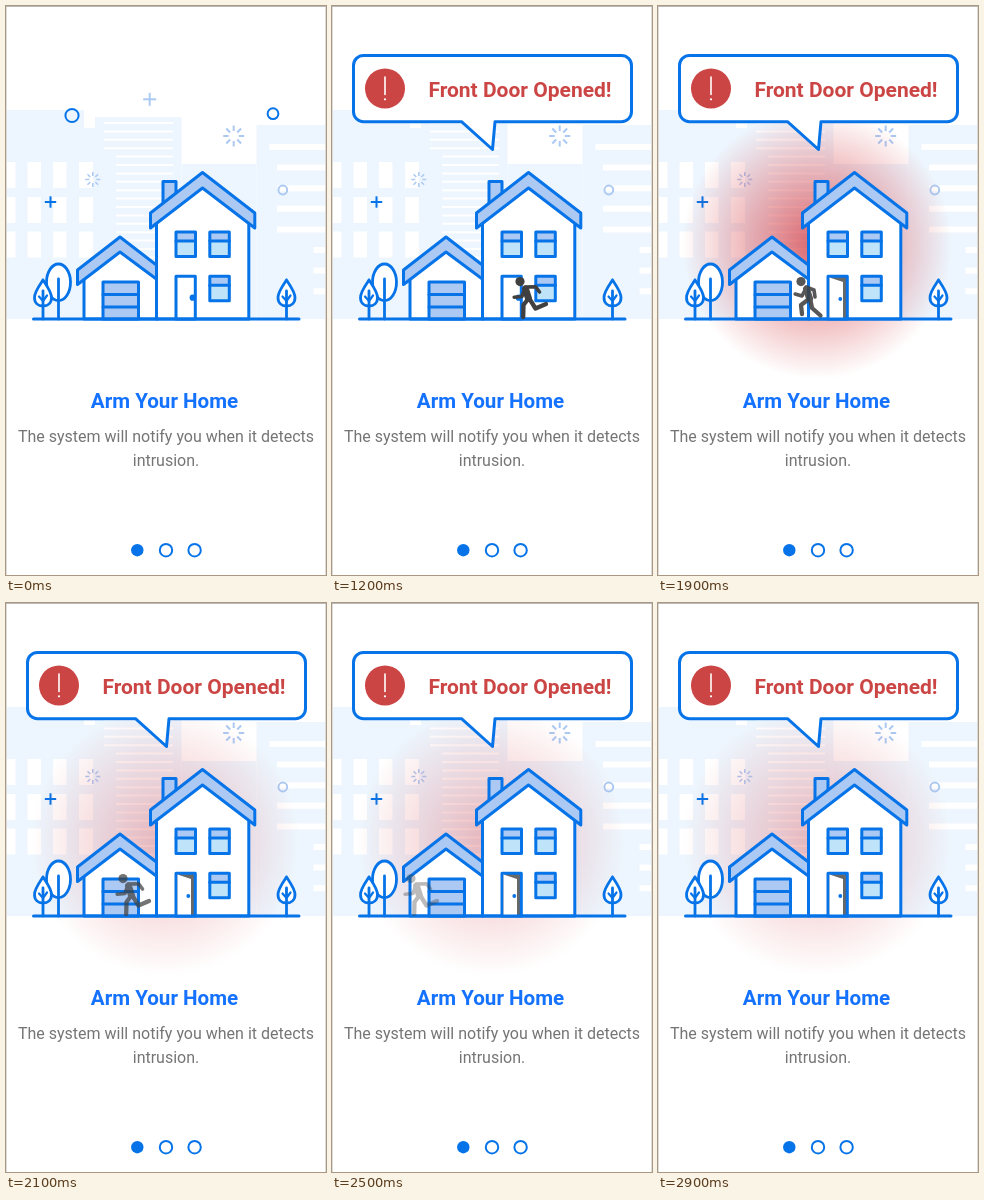
Recreate the animation shown at these times as an HTML page with a canvas. Size 320 by 569 pixels, loop 3100 ms.

```html
<!DOCTYPE html>
<html lang="en">
<head>
<meta charset="utf-8">
<title>Arm Your Home</title>
<style>
  html, body { margin: 0; width: 100%; height: 100%; overflow: hidden; background: #fff; }
  canvas { display: block; width: 320px; height: 569px; }
</style>
</head>
<body>
<canvas id="stage"></canvas>
<script>
const W = 320, H = 569, LOOP = 3100, STEP = 200;
const BLUE = '#0674e8', PALE = '#abc9f3', GLASS = '#bfe4f9', CITY = '#edf6fe';
const RED = '#cc4545', DARK = '#404040';

const canvas = document.getElementById('stage');
const ratio = window.devicePixelRatio || 1;
canvas.width = W * ratio;
canvas.height = H * ratio;
const ctx = canvas.getContext('2d');
ctx.scale(ratio, ratio);
ctx.lineCap = ctx.lineJoin = 'round';

function paint(fill, stroke, width = 3) {
  if (fill) { ctx.fillStyle = fill; ctx.fill(); }
  if (stroke) { ctx.strokeStyle = stroke; ctx.lineWidth = width; ctx.stroke(); }
}

function box(x, y, w, h, fill, stroke, width) {
  ctx.beginPath();
  ctx.rect(x, y, w, h);
  paint(fill, stroke, width);
}

function poly(points, fill, stroke, width) {
  ctx.beginPath();
  points.forEach(([x, y]) => ctx.lineTo(x, y));
  ctx.closePath();
  paint(fill, stroke, width);
}

function line(points, color = BLUE, width = 3) {
  ctx.beginPath();
  points.forEach(([x, y]) => ctx.lineTo(x, y));
  paint(null, color, width);
}

function circle(x, y, r, fill, stroke, width) {
  ctx.beginPath();
  ctx.arc(x, y, r, 0, Math.PI * 2);
  paint(fill, stroke, width);
}

function plus(x, y, r, color) {
  ctx.lineCap = 'butt';
  line([[x - r, y], [x + r, y]], color, 2);
  line([[x, y - r], [x, y + r]], color, 2);
  ctx.lineCap = 'round';
}

function burst(x, y, inner, outer, width) {
  ctx.lineCap = 'butt';
  for (let i = 0; i < 8; i++) {
    const c = Math.cos(i * Math.PI / 4), s = Math.sin(i * Math.PI / 4);
    line([[x + c * inner, y + s * inner], [x + c * outer, y + s * outer]], PALE, width);
  }
  ctx.lineCap = 'round';
}

function text(str, x, y, font, color) {
  ctx.font = font + ' Roboto, sans-serif';
  ctx.textAlign = 'center';
  ctx.fillStyle = color;
  ctx.fillText(str, x, y);
}

function city() {
  const ground = 313;
  [[0, 104, 78], [78, 122, 11], [89, 111, 86.5], [175.5, 158, 75], [250.5, 119, 69.5]]
    .forEach(([x, y, w]) => box(x, y, w, ground - y, CITY));
  for (const y of [156, 191, 225.5])
    for (const [x, w] of [[0, 9.5], [21.5, 13.5], [47, 13.5], [73, 14]])
      box(x, y, w, 26, '#fff');
  for (let i = 0; i < 17; i++) {
    const x = i < 4 ? 98 : 110;
    box(x, 116 + i * 8.4, 167 - x, 2, '#fff');
  }
  for (let i = 0; i < 8; i++) {
    const x = i === 0 ? 263.5 : i < 5 ? 271 : 307.5;
    box(x, 138 + i * 20.6, W - x, 6, '#fff');
  }
}

function decor() {
  circle(66, 109.5, 6.6, null, BLUE, 2);
  circle(267, 107.7, 5.4, null, BLUE, 2);
  circle(276.8, 184, 4.4, null, PALE, 2);
  plus(143.7, 93.3, 6.5, PALE);
  plus(44.5, 196, 5.7, BLUE);
  burst(227.7, 130, 5, 10.5, 2);
  burst(86.8, 173.5, 3.5, 7.5, 1.5);
}

function glow(strength) {
  const x = 159, y = 238, r = 135;
  const g = ctx.createRadialGradient(x, y, 0, x, y, r);
  g.addColorStop(0, `rgba(214,66,72,${strength})`);
  g.addColorStop(1, 'rgba(214,66,72,0)');
  circle(x, y, r, g);
}

function leafTree(x) {
  ctx.beginPath();
  ctx.moveTo(x, 274);
  ctx.bezierCurveTo(x + 4, 280, x + 8.5, 286, x + 8.5, 291.5);
  ctx.bezierCurveTo(x + 8.5, 297, x + 5, 300, x, 300);
  ctx.bezierCurveTo(x - 5, 300, x - 8.5, 297, x - 8.5, 291.5);
  ctx.bezierCurveTo(x - 8.5, 286, x - 4, 280, x, 274);
  paint('#fff', BLUE, 2.8);
  line([[x, 285], [x, 313]], BLUE, 2.8);
  line([[x - 4, 290.5], [x, 295], [x + 4, 289.5]], BLUE, 2.2);
}

function trees() {
  ctx.beginPath();
  ctx.ellipse(52.5, 276.3, 12, 18.3, 0, 0, Math.PI * 2);
  paint('#fff', BLUE, 2.8);
  line([[52.5, 273], [52.5, 313]], BLUE, 2.8);
  leafTree(37);
  leafTree(280.5);
}

function garage() {
  poly([[78, 313], [78, 270], [114, 240], [151, 270], [151, 313]], '#fff', BLUE);
  box(97, 276, 35.5, 37, PALE, BLUE);
  line([[97, 288.5], [132, 288.5]]);
  line([[97, 301], [132, 301]]);
  poly([[71.5, 264], [114, 231], [151, 259.5], [151, 273.5], [114, 246], [71.5, 278.5]], PALE, BLUE);
}

function windowPane(x, y) {
  box(x, y, 19.5, 24.5, GLASS);
  box(x, y, 19.5, 9, PALE);
  box(x, y, 19.5, 24.5, null, BLUE);
  line([[x, y + 9], [x + 19.5, y + 9]]);
}

function house(doorOpen) {
  box(157, 175.5, 13, 30, PALE, BLUE);
  poly([[150.5, 313], [150.5, 210], [196.5, 174], [242.8, 210], [242.8, 313]], '#fff', BLUE);
  poly([[144.5, 207], [196.5, 166.5], [248.8, 207], [248.8, 222], [196.5, 182], [144.5, 222]], PALE, BLUE);
  windowPane(170, 226);
  windowPane(203.8, 226);
  windowPane(203.8, 270.3);
  box(170, 270.3, 19.3, 42.7, doorOpen ? '#686868' : '#fff', BLUE);
  if (doorOpen) {
    poly([[171.5, 271.5], [185, 276], [185, 313], [171.5, 313]], '#fff');
    circle(182.3, 293, 1.9, BLUE);
  } else {
    circle(186.7, 291.7, 3.1, BLUE);
  }
}

// Limbs are drawn relative to the left edge of the figure.
const STRIDE = {
  frontArm: [[12.5, 283], [10, 290.5], [2.2, 291.2]],
  backArm: [[13, 281], [23.5, 280.7], [27.5, 286]],
  frontLeg: [[16, 293], [11.5, 299], [11.2, 311]],
  backLeg: [[17, 292], [23.5, 302.5], [34, 298]]
};
const GATHER = {
  frontArm: [[12.5, 283], [9, 290], [2.2, 288]],
  backArm: [[13, 281], [21, 284], [22, 291]],
  frontLeg: [[16, 293], [8, 299], [9, 308]],
  backLeg: [[17, 292], [19, 302], [27.5, 309.5]]
};

function burglar(x, pose, alpha) {
  // A separate layer keeps overlapping limbs even while fading.
  layer.clearRect(0, 0, W, H);
  layer.save();
  layer.translate(x, 0);
  layer.lineCap = layer.lineJoin = 'round';
  layer.strokeStyle = layer.fillStyle = DARK;
  const limb = (points, width) => {
    layer.lineWidth = width;
    layer.beginPath();
    points.forEach(([px, py]) => layer.lineTo(px, py));
    layer.stroke();
  };
  layer.beginPath();
  layer.arc(8, 275.6, 4.6, 0, Math.PI * 2);
  layer.fill();
  limb([[13.5, 283], [16.5, 292.5]], 7);
  limb(pose.frontArm, 3.6);
  limb(pose.backArm, 3.6);
  limb(pose.frontLeg, 4.3);
  limb(pose.backLeg, 4.3);
  layer.restore();
  ctx.globalAlpha = alpha;
  ctx.drawImage(layer.canvas, 0, 0, W, H);
  ctx.globalAlpha = 1;
}

const layerCanvas = document.createElement('canvas');
layerCanvas.width = canvas.width;
layerCanvas.height = canvas.height;
const layer = layerCanvas.getContext('2d');
layer.scale(ratio, ratio);

function bubble() {
  const l = 21.5, t = 49.5, r = 299.5, b = 115.7, c = 10;
  ctx.beginPath();
  ctx.moveTo(l + c, t);
  ctx.arcTo(r, t, r, b, c);
  ctx.arcTo(r, b, l, b, c);
  ctx.lineTo(163, b);
  ctx.lineTo(160.5, 143.5);
  ctx.lineTo(129.5, b);
  ctx.arcTo(l, b, l, t, c);
  ctx.arcTo(l, t, r, t, c);
  ctx.closePath();
  paint('#fff', BLUE);
  circle(53, 82.5, 20, RED);
  line([[53, 71], [53, 88.5]], '#fff', 1.6);
  circle(53, 93.3, 1.1, '#fff');
  text('Front Door Opened!', 188, 91, 'bold 21px', RED);
}

function caption() {
  text('Arm Your Home', 158.5, 402, 'bold 20.6px', '#1472ff');
  text('The system will notify you when it detects', 160, 436, '16px', '#757575');
  text('intrusion.', 160, 460, '16px', '#757575');
  circle(131.3, 544.2, 6.2, BLUE);
  circle(160, 544.2, 6.2, null, BLUE, 2);
  circle(188.6, 544.2, 6.2, null, BLUE, 2);
}

function drawBurglar(t) {
  const approach = [239, 227, 208, 196, 180];
  const escape = [147, 135, 109, 97, 71, 59];
  const fade = [1, 0.88, 0.72, 0.53, 0.35, 0.17];
  if (t < 200 || t >= 2900) return;
  if (t < 1700) {
    const i = Math.min(Math.floor((t - 200) / STEP), 4);
    burglar(approach[i], i % 2 ? GATHER : STRIDE, 1);
  } else {
    const i = Math.floor((t - 1700) / STEP);
    burglar(escape[i], i % 2 ? GATHER : STRIDE, fade[i]);
  }
}

function render(t) {
  const alarm = t >= 1700;
  box(0, 0, W, H, '#fff');
  city();
  decor();
  if (alarm) glow(Math.floor((t - 1700) / STEP) % 2 ? 0.8 : 0.37);
  trees();
  garage();
  house(alarm);
  line([[27.5, 313], [293, 313]]);
  drawBurglar(t);
  if (t >= 1200) bubble();
  caption();
  box(0, 0, 1, H, '#dcdcdc');
  box(W - 1, 0, 1, H, '#dcdcdc');
  box(0, 0, W, 1, '#b8b8b8');
}

const start = performance.now();
function tick() {
  render((performance.now() - start) % LOOP);
  requestAnimationFrame(tick);
}
tick();
</script>
</body>
</html>
```
